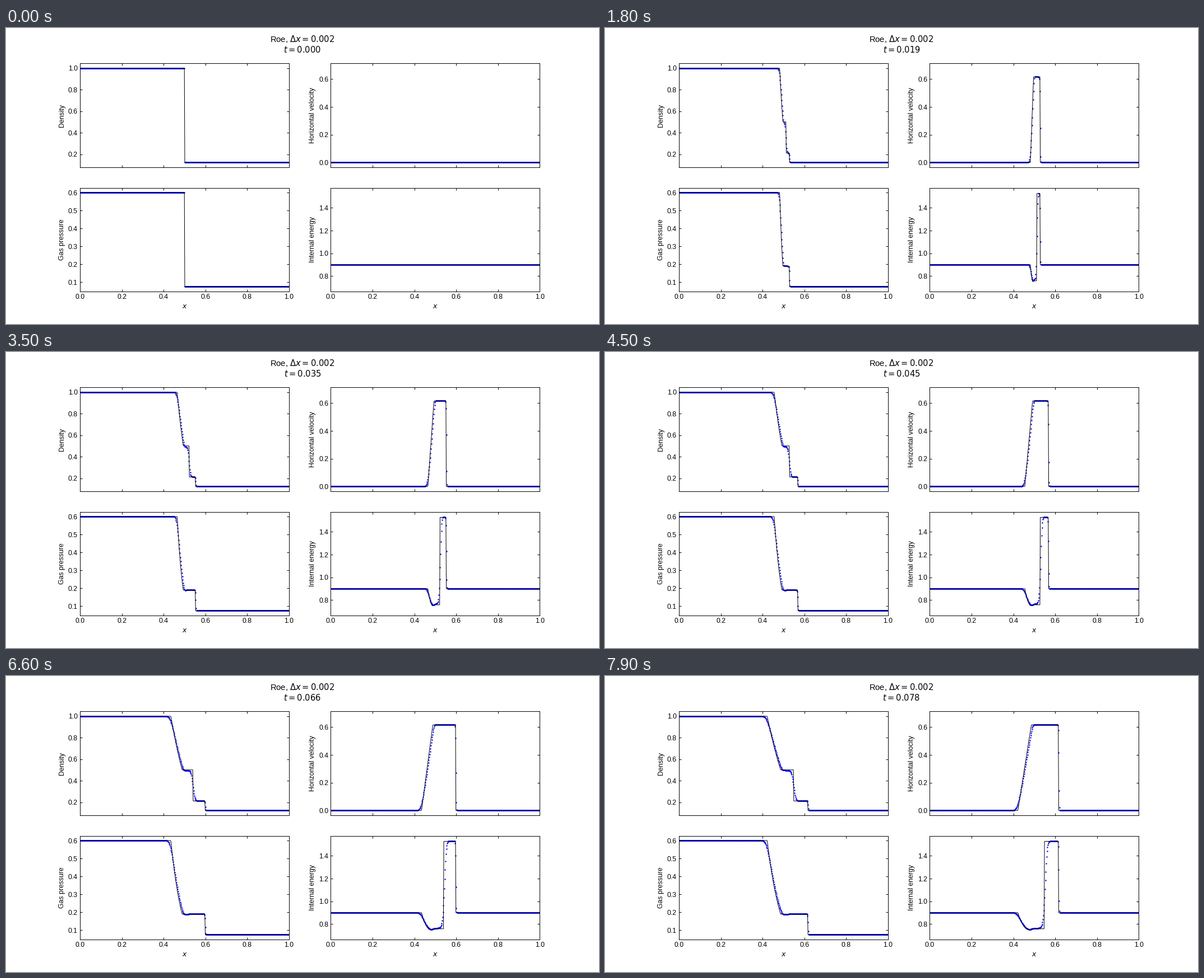
Write a matplotlib script that moves like this. It is 1058 px wide and 529 px high and loops after 8 s.

```python
import numpy as np
import matplotlib.pyplot as plt
from matplotlib.animation import FuncAnimation
from matplotlib.ticker import MultipleLocator

FRAMES, INTERVAL = 80, 100
GAMMA = 5 / 3
G1 = GAMMA - 1
DX, CFL = 0.002, 0.9
X = (np.arange(500) + 0.5) * DX
X0 = 0.5
RHO_L, P_L = 1.0, 0.6
RHO_R, P_R = 0.125, 0.075


def primitives(q):
    rho, mom, ener = q
    u = mom / rho
    return rho, u, G1 * (ener - 0.5 * mom * u)


def roe_flux(ql, qr):
    (rl, ul, pl), (rr, ur, pr) = primitives(ql), primitives(qr)
    hl, hr = (ql[2] + pl) / rl, (qr[2] + pr) / rr
    wl, wr = np.sqrt(rl), np.sqrt(rr)
    u = (wl * ul + wr * ur) / (wl + wr)
    h = (wl * hl + wr * hr) / (wl + wr)
    c = np.sqrt(G1 * (h - 0.5 * u * u))
    drho, du, dp = rr - rl, ur - ul, pr - pl
    rho = wl * wr
    a1 = abs(u - c) * (dp - rho * c * du) / (2 * c * c)
    a2 = abs(u) * (drho - dp / (c * c))
    a3 = abs(u + c) * (dp + rho * c * du) / (2 * c * c)
    fl = np.array([ql[1], ql[1] * ul + pl, ql[1] * hl])
    fr = np.array([qr[1], qr[1] * ur + pr, qr[1] * hr])
    diss = np.array([a1 + a2 + a3,
                     a1 * (u - c) + a2 * u + a3 * (u + c),
                     a1 * (h - u * c) + a2 * u * u / 2 + a3 * (h + u * c)])
    return 0.5 * (fl + fr - diss)


def simulate():
    """Conserved state and time at every step of the Roe scheme."""
    rho = np.where(X < X0, RHO_L, RHO_R)
    p = np.where(X < X0, P_L, P_R)
    q, t, steps = np.array([rho, 0 * rho, p / G1]), 0.0, []
    for _ in range(FRAMES):
        steps.append((t, q))
        rho, u, p = primitives(q)
        dt = CFL * DX / np.max(abs(u) + np.sqrt(GAMMA * p / rho))
        ext = np.pad(q, ((0, 0), (1, 1)), mode="edge")
        q = q - dt / DX * np.diff(roe_flux(ext[:, :-1], ext[:, 1:]), axis=1)
        t += dt
    return steps


def star_state():
    """Pressure and velocity between the rarefaction and the shock."""
    c = np.sqrt(GAMMA * P_L / RHO_L)
    a, b = 2 / ((GAMMA + 1) * RHO_R), P_R * G1 / (GAMMA + 1)
    lo, hi = P_R, P_L
    for _ in range(60):
        p = (lo + hi) / 2
        u_fan = 2 * c / G1 * (1 - (p / P_L) ** (G1 / (2 * GAMMA)))
        u_shock = (p - P_R) * np.sqrt(a / (p + b))
        lo, hi = (p, hi) if u_fan > u_shock else (lo, p)
    return p, u_fan


P_S, U_S = star_state()


def exact(t):
    s = (X - X0) / max(t, 1e-9)
    c = np.sqrt(GAMMA * P_L / RHO_L)
    k = G1 / (GAMMA + 1)
    ratio = P_S / P_R
    rho_s = RHO_R * (ratio + k) / (k * ratio + 1)
    shock = rho_s * U_S / (rho_s - RHO_R)
    # the rarefaction runs from the left state down to the star velocity
    u = np.clip(2 / (GAMMA + 1) * (c + s), 0, U_S)
    cf = c - G1 / 2 * u
    rho = RHO_L * (cf / c) ** (2 / G1)
    p = P_L * (cf / c) ** (2 * GAMMA / G1)
    rho = np.where(s > U_S, rho_s, rho)
    ahead = s > shock
    rho, u, p = (np.where(ahead, r, v)
                 for r, v in ((RHO_R, rho), (0, u), (P_R, p)))
    return rho, u, p, p / (G1 * rho) + u * u / 2


STEPS = simulate()

plt.rcParams.update({
    "font.family": "Liberation Sans", "mathtext.fontset": "dejavusans",
    "xtick.direction": "in", "ytick.direction": "in",
    "xtick.top": True, "ytick.right": True})
fig, axes = plt.subplots(2, 2, sharex=True, figsize=(12, 6), dpi=1058 / 12)
title = fig.suptitle("")

PANELS = (("Density", 0.08125, 1.04375, 0.2),
          ("Horizontal velocity", -0.034, 0.713, 0.2),
          ("Gas pressure", 0.04875, 0.62625, 0.1),
          ("Internal energy", 0.6645, 1.5765, 0.2))
dots, lines = [], []
for ax, (name, low, high, step) in zip(axes.flat, PANELS):
    ax.set(xlim=(0, 1), ylim=(low, high), ylabel=name)
    ax.yaxis.set_major_locator(MultipleLocator(step))
    dots += ax.plot([], [], "b.", ms=2)
    lines += ax.plot([], [], "k-", lw=0.8)
for ax in axes[1]:
    ax.set_xlabel("$x$")


def update(i):
    t, q = STEPS[i]
    numeric = (*primitives(q), q[2] / q[0])
    for dot, line, y, ye in zip(dots, lines, numeric, exact(t)):
        dot.set_data(X, y)
        line.set_data(X, ye)
    title.set_text(f"Roe, $\\Delta x = 0.002$\n$t = {t:.3f}$")
    return dots + lines + [title]


anim = FuncAnimation(fig, update, frames=FRAMES, interval=INTERVAL,
                     repeat=True, repeat_delay=0)
plt.show()
```
